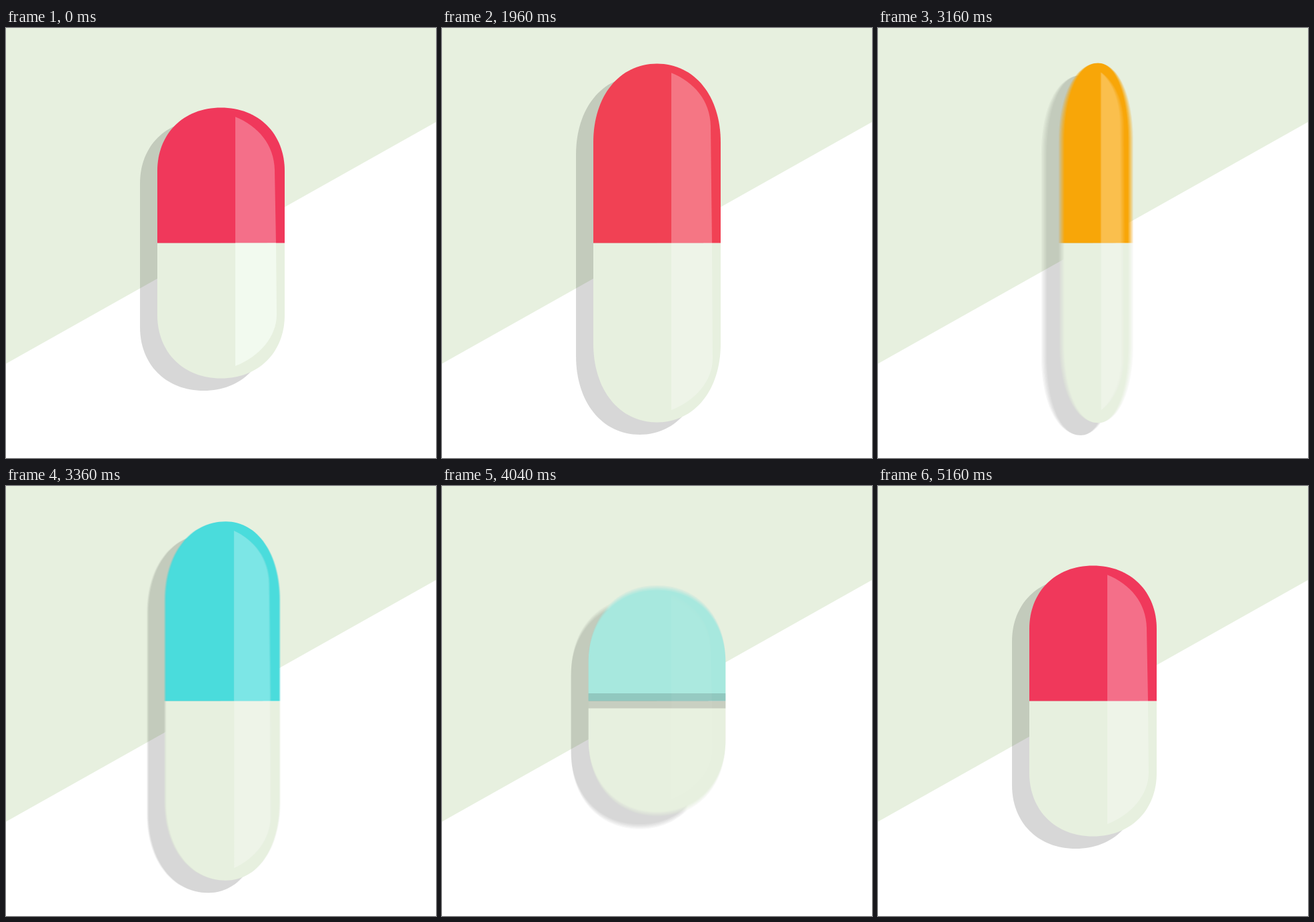
Recreate the animation shown at these times as an HTML page with a canvas. Size 645 px wide and 645 px high, loop 5.28 s.

```html
<!DOCTYPE html>
<html lang="en">
<head>
<meta charset="utf-8">
<title>Pill</title>
<style>
html, body { margin: 0; width: 100%; height: 100%; overflow: hidden; background: #fff; }
canvas { display: block; width: 645px; height: 645px; }
</style>
</head>
<body>
<canvas id="stage" width="645" height="645"></canvas>
<script>
const ctx = document.getElementById('stage').getContext('2d');
const LOOP = 5280, STEP = 40, SHUTTER = 14, SAMPLES = 8, MID = 322.5;
const MOVES = [[920, 1320], [2960, 3480], [3800, 4210], [4760, 5160]];

const PALE = [231, 240, 223], RED = [240, 56, 91], ORANGE = [248, 166, 8], TEAL = [74, 220, 220];
// top edge, half width, cap height
const SHORT = [119.5, 95.5, 95], TALL = [53.5, 95.5, 118], ROUND = [215, 107.5, 107.5];

const rgb = c => `rgb(${c.map(Math.round)})`;
const mix = (a, b, p) => a.map((v, i) => v + (b[i] - v) * p);
const ramp = (t, from, to) => Math.min(1, Math.max(0, (t - from) / (to - from)));
const ease = (t, from, to) => { const u = ramp(t, from, to); return u * u * (3 - 2 * u); };

function pose(t) {
  const grow = ease(t, 930, 1320);
  const press = ease(t, 3815, 4205);
  const back = ease(t, 4760, 5160);
  const squeeze = t < 3220 ? ramp(t, 2960, 3220) ** 3 : (1 - ramp(t, 3220, 3480)) ** 3;

  let shape = mix(SHORT, TALL, grow);
  shape = mix(shape, ROUND, press);
  const [top, half, cap] = mix(shape, SHORT, back);

  let color = t < 3220 ? mix(RED, ORANGE, ramp(t, 1930, 2280)) : TEAL;
  color = mix(mix(color, PALE, press), RED, back);

  const width = half * (1 - squeeze), center = MID + 6.8 * Math.sqrt(squeeze);
  return {
    top: top - 2 * squeeze, cap, color, scale: 1 - squeeze,
    left: center - width, right: center + width,
    apex: MID + 7.5 * Math.min(1, squeeze * 10) * Math.min(1, (1 - squeeze) * 3),
    tablet: press * (1 - back),
    shine: 0.28 * Math.max((1 - press) ** 2, back)
  };
}

// One half of the pill; side is 1 for the upper half, -1 for the lower one.
function half(p, side, fill) {
  const y = d => MID - side * (MID - d), k = 0.59;
  const { left, right, apex, top, cap } = p;
  const shoulder = top + cap, handle = shoulder - cap * k;
  ctx.beginPath();
  ctx.moveTo(left, MID);
  ctx.lineTo(left, y(shoulder));
  ctx.bezierCurveTo(left, y(handle), apex - (apex - left) * k, y(top), apex, y(top));
  ctx.bezierCurveTo(apex + (right - apex) * k, y(top), right, y(handle), right, y(shoulder));
  ctx.lineTo(right, MID);
  ctx.fillStyle = fill;
  ctx.fill();
}

function shine(p, still) {
  const x = v => MID + (v - MID) * p.scale;
  const a = p.top + 13.7, b = 645 - p.top - 18.5;
  ctx.fillStyle = `rgba(255,255,255,${p.shine})`;
  ctx.beginPath();
  ctx.moveTo(x(344), MID);
  ctx.lineTo(x(344), a);
  ctx.bezierCurveTo(x(378), a + 14, x(402), a + 41, x(403), a + 80);
  ctx.lineTo(x(405), MID);
  ctx.fill();

  if (still) ctx.fillStyle = '#f2faef';
  ctx.beginPath();
  ctx.moveTo(x(344), MID);
  ctx.lineTo(x(405), MID);
  ctx.lineTo(x(406), b - 77);
  ctx.bezierCurveTo(x(406), b - 44, x(380), b - 14, x(344), b);
  ctx.fill();
}

function paint(t) {
  const p = pose(t);
  ctx.fillStyle = '#fff';
  ctx.fillRect(0, 0, 645, 645);
  ctx.fillStyle = rgb(PALE);
  ctx.beginPath();
  ctx.moveTo(0, 0);
  ctx.lineTo(645, 0);
  ctx.lineTo(645, 141);
  ctx.lineTo(0, 503.5);
  ctx.fill();

  // The halves of the shadow meet on a whole pixel so that no seam shows.
  ctx.save();
  ctx.translate(-26, 18.5);
  for (const side of [1, -1]) half(p, side, 'rgba(0,0,0,.156)');
  ctx.restore();

  half(p, -1, rgb(PALE));
  half(p, 1, rgb(p.color));
  if (p.tablet > 0) {
    ctx.fillStyle = `rgba(0,0,0,${0.22 * p.tablet})`;
    ctx.fillRect(p.left, 311, p.right - p.left, 22.5);
  }
  shine(p, t < 920);
}

function frame(now) {
  const t = Math.floor(now % LOOP / STEP) * STEP;
  const moving = MOVES.some(([from, to]) => t > from && t < to);
  const count = moving ? SAMPLES : 1;
  // Average several moments within the shutter time for motion blur.
  for (let i = 0; i < count; i++) {
    const moment = moving ? t + SHUTTER * ((i + 0.5) / count - 0.5) : t;
    if (i === 0) paint(moment);
    else blend(moment, 1 / (i + 1));
  }
  requestAnimationFrame(() => frame(performance.now() - start));
}

const held = document.createElement('canvas');
held.width = held.height = 645;
const heldCtx = held.getContext('2d');

function blend(moment, share) {
  heldCtx.drawImage(ctx.canvas, 0, 0);
  paint(moment);
  ctx.globalAlpha = 1 - share;
  ctx.drawImage(held, 0, 0);
  ctx.globalAlpha = 1;
}

const start = performance.now();
frame(0);
</script>
</body>
</html>
```
